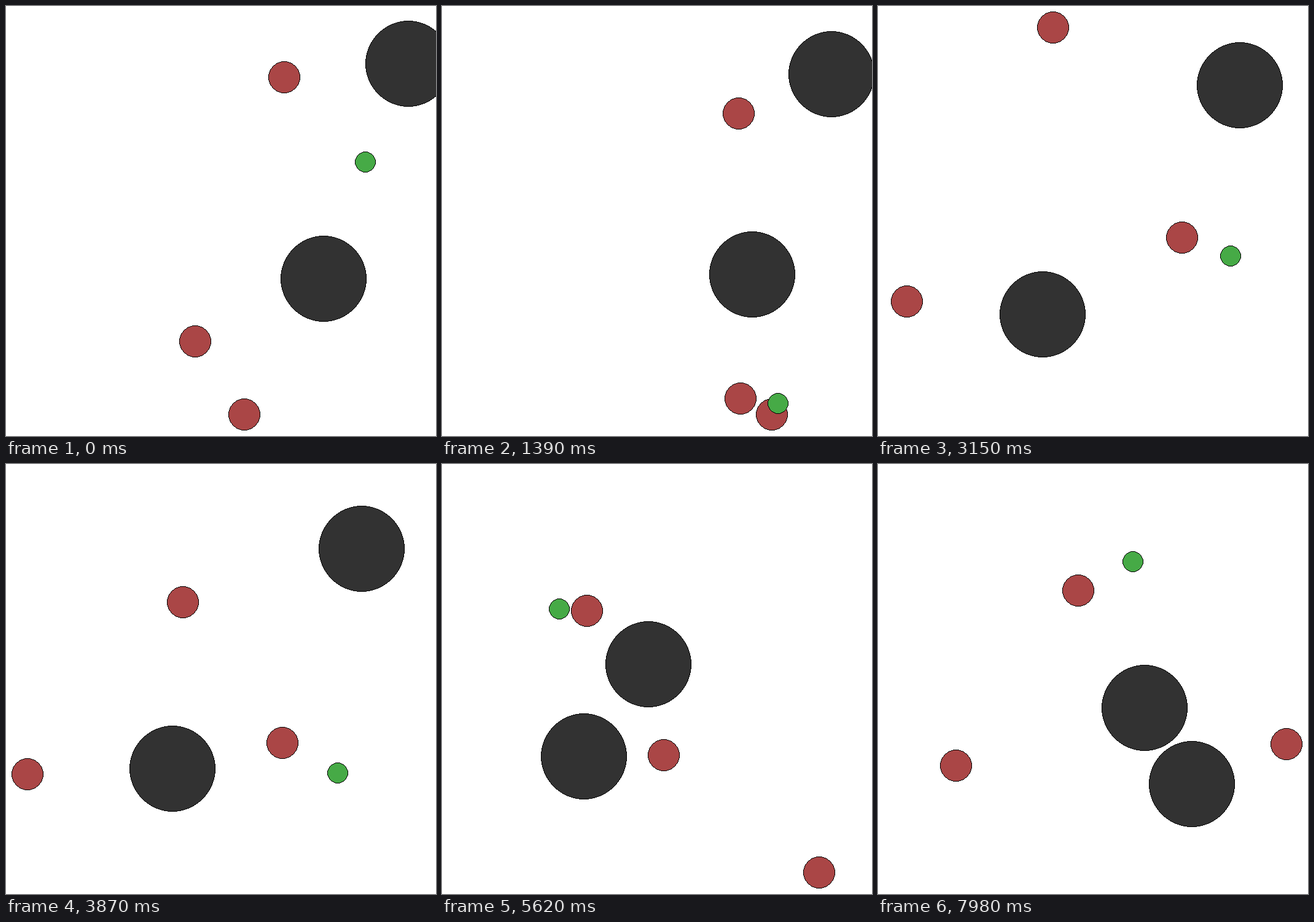
Animation of 700x700 px, one loop 8 s. Source, as an HTML page with a canvas:

```html
<!DOCTYPE html>
<html lang="en">
<head>
<meta charset="utf-8">
<title>Chase</title>
<style>
  html, body { margin: 0; width: 100%; height: 100%; overflow: hidden; background: #fff; }
  canvas { display: block; width: 700px; height: 700px; }
</style>
</head>
<body>
<canvas id="stage" width="700" height="700"></canvas>
<script>
const ctx = document.getElementById('stage').getContext('2d');
const SIZE = 700, REACH = 315;
const LOOP = 8000, ROUND = 1510, HOLD = 130, STEP = 60;
const DRAG = 0.25;

// Distance covered after k steps of constant thrust against drag, at cruise speed 1.
const glide = k => k - (1 / DRAG - 1) * (1 - (1 - DRAG) ** k);

// A body passes (x, y), measured from the centre, at the key step of its round.
// The bend curves its path between the start and the key step.
const body = (r, fill) => (x, y, vx = 0, vy = 0, bendX = 0, bendY = 0) => ({
  r, fill,
  at(k, key) {
    const run = glide(k) - glide(key), bow = k * (k - key);
    return { x: x + vx * run + bendX * bow, y: y + vy * run + bendY * bow };
  }
});
const chaser = body(26, 'rgb(170,70,70)');
const runner = body(17, 'rgb(70,170,70)');
const rock = body(70, 'rgb(50,50,50)');

const rounds = [
  { key: 22, bodies: [
    chaser(142.9, -188, 2.1, 2.42),
    chaser(146.1, 310.5, 9.9, 6.025, 0, 0.15),
    chaser(200.9, 338.4, 8.57, 1.23, 0, 0.3),
    runner(211.6, 319.1, -1.23, 21.84, -0.28),
    rock(305.4, -256.4), rock(167, 93.6)
  ] },
  { key: 14, bodies: [
    chaser(-222, -153, -1, -3),
    chaser(100, 200, 4, 5),
    chaser(315, 187, 4.4, 5),
    runner(233, -258, 4, -8),
    rock(-130, 95), rock(-24, 229)
  ] },
  { key: 13, bodies: [
    chaser(-62, -125, 0, 18),
    chaser(100, 104, -4, 8),
    chaser(-315, 155, -1.3, 3, -1),
    runner(190, 153, -2.5, 10),
    rock(229, -212), rock(-79, 146)
  ] },
  { key: 17, bodies: [
    chaser(-114, -111, -5, -2.5),
    chaser(11, 124, -2, 4),
    chaser(264, 315, 12.4, 12.6),
    runner(-159, -114, -4, -3),
    rock(-14, -24), rock(-119, 126)
  ] },
  { key: 16, bodies: [
    chaser(289, 28, 8, 17),
    chaser(-38, 126, -4.5, 3),
    chaser(-164, 212, -6.5, -2),
    runner(-285, 171, -5, 3),
    rock(-315, 42), rock(-192, 61)
  ] },
  { key: 6, bodies: [
    chaser(-24, -144, 4, -5),
    chaser(-223, 141, 8, -2),
    chaser(315, 106, 30, 7),
    runner(65, -191, 1.5, -6.5),
    rock(84, 47), rock(161, 171)
  ] }
];

// Half the width of pixel row i, counted from 1 at the middle of a disc.
function halfWidth(r, i) {
  if (i > r) return 0;
  return i <= r * Math.SQRT1_2
    ? Math.round(Math.sqrt(r * r - i * i))
    : Math.floor(Math.sqrt(r * r - (i - 0.5) ** 2));
}

function rowPair(x, y, i, half) {
  ctx.fillRect(x - half, y - i, 2 * half, 1);
  ctx.fillRect(x - half, y + i - 1, 2 * half, 1);
}

// A hard-edged disc with a one-pixel black rim.
function disc(x, y, r, fill) {
  for (let i = 1; i <= r; i++) {
    const half = halfWidth(r, i);
    ctx.fillStyle = '#000';
    rowPair(x, y, i, half);
    ctx.fillStyle = fill;
    rowPair(x, y, i, Math.min(half - 1, halfWidth(r, i + 1)));
  }
}

function draw(t) {
  const { key, bodies } = rounds[Math.floor(t / ROUND)];
  const k = Math.max(0, Math.floor((t % ROUND - HOLD) / STEP) + 1);
  const spots = bodies.map(b => b.at(k, key));

  // The view zooms so that the farthest centre always sits on the inner frame.
  const zoom = REACH / Math.max(...spots.flatMap(p => [Math.abs(p.x), Math.abs(p.y)]));
  const place = v => Math.round(SIZE / 2 + v * zoom);

  ctx.fillStyle = '#fff';
  ctx.fillRect(0, 0, SIZE, SIZE);
  bodies.forEach((b, i) => disc(place(spots[i].x), place(spots[i].y), b.r, b.fill));
}

const begin = performance.now();
function tick() {
  draw((performance.now() - begin) % LOOP);
  requestAnimationFrame(tick);
}
tick();
</script>
</body>
</html>
```
